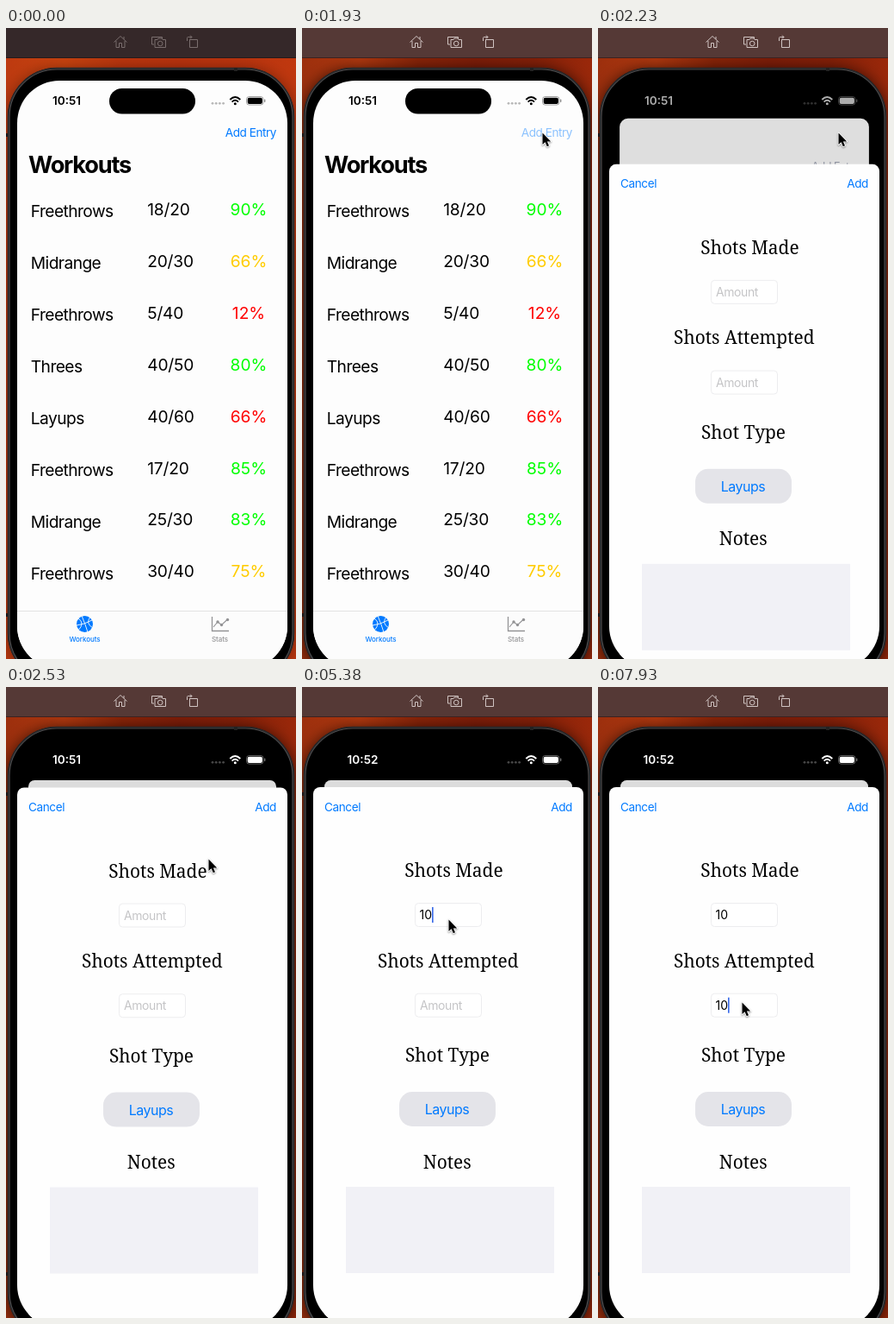
An HTML page with a canvas that plays this animation: 337x731 px, repeating every 8 s.

```html
<!DOCTYPE html>
<html lang="en">
<head>
<meta charset="utf-8">
<title>Workout tracker</title>
<style>
  html, body { margin: 0; height: 100%; overflow: hidden; background: #000; }
  canvas { display: block; width: 337px; height: 731px; }
</style>
</head>
<body>
<canvas></canvas>
<script>
const W = 337, H = 731, LOOP = 8000, TICK = 150;
const BLUE = '#007aff', GREEN = '#0f0', YELLOW = '#fc0', RED = '#f00';
const canvas = document.querySelector('canvas');
const ctx = canvas.getContext('2d');
const ratio = window.devicePixelRatio || 1;
canvas.width = W * ratio;
canvas.height = H * ratio;

const rows = [
  ['Freethrows', '18/20', '90%', GREEN],
  ['Midrange', '20/30', '66%', YELLOW],
  ['Freethrows', '5/40', '12%', RED],
  ['Threes', '40/50', '80%', GREEN],
  ['Layups', '40/60', '66%', RED],
  ['Freethrows', '17/20', '85%', GREEN],
  ['Midrange', '25/30', '83%', GREEN],
  ['Freethrows', '30/40', '75%', YELLOW],
];

// Pointer path: time, x, y
const pointerPath = [
  [900, 326, 330], [1180, 304, 262], [1330, 298, 236], [1480, 281, 162],
  [1630, 279, 123], [1930, 279, 121], [2380, 279, 121], [2530, 235, 199],
  [2680, 205, 236], [2830, 181, 262], [2980, 169, 272], [3280, 169, 271],
  [3430, 170, 269], [6280, 170, 269], [6430, 171, 292], [6730, 169, 354],
  [6880, 167, 365], [LOOP, 167, 365],
];

const clamp = v => Math.min(1, Math.max(0, v));
const mix = (a, b, k) => a + (b - a) * k;

function pointerAt(t) {
  const i = pointerPath.findIndex(key => key[0] > t);
  const [t0, x0, y0] = pointerPath[i - 1], [t1, x1, y1] = pointerPath[i];
  const k = (t - t0) / (t1 - t0);
  return [mix(x0, x1, k), mix(y0, y1, k)];
}

function text(str, x, y, size, color = '#000', opts = {}) {
  const { align = 'left', weight = 400, spacing = -0.03, family = 'Inter, sans-serif' } = opts;
  ctx.font = `${weight} ${size}px ${family}`;
  ctx.letterSpacing = `${spacing * size}px`;
  ctx.textAlign = align;
  ctx.fillStyle = color;
  ctx.fillText(str, x, y);
}

function box(x, y, w, h, r, fill, stroke, width = 1) {
  ctx.beginPath();
  ctx.roundRect(x, y, w, h, r);
  if (fill) { ctx.fillStyle = fill; ctx.fill(); }
  if (stroke) { ctx.strokeStyle = stroke; ctx.lineWidth = width; ctx.stroke(); }
}

function line(d, color, width = 1) {
  ctx.strokeStyle = color;
  ctx.lineWidth = width;
  ctx.stroke(new Path2D(d));
}

function disc(x, y, r, color) {
  ctx.fillStyle = color;
  ctx.beginPath();
  ctx.arc(x, y, r, 0, 7);
  ctx.fill();
}

function scoped(draw) {
  ctx.save();
  draw();
  ctx.restore();
}

function drawDesktop(active) {
  const wall = ctx.createLinearGradient(0, 0, W, 0);
  const stops = active
    ? ['#9c2f0d', '#b0380f', '#8a2408', '#801d08', '#862008', '#9a280a']
    : ['#bd3a10', '#c9430f', '#bb350e', '#b8320e', '#bb340e', '#c0380f'];
  stops.forEach((c, i) => wall.addColorStop(i / (stops.length - 1), c));
  ctx.fillStyle = wall;
  ctx.fillRect(0, 0, W, H);

  scoped(() => {
    ctx.shadowColor = `rgba(0,0,0,${active ? 0.7 : 0.4})`;
    ctx.shadowBlur = 18 * ratio;
    ctx.shadowOffsetY = 2 * ratio;
    box(2, 46, 333, 712, 57, '#111');
  });

  ctx.fillStyle = active ? '#553936' : '#352829';
  ctx.fillRect(0, 0, W, 34);
  ctx.fillStyle = active ? '#3c2220' : '#261a1a';
  ctx.fillRect(0, 34, W, 1);
  const ink = active ? '#d0c4c2' : '#796d6d';
  line('M125.5 16.5 133 9.5 140.5 16.5M128 15V22.5H131.5V17.5H134.5V22.5H138V15M137 10V13', ink);
  line('M172 19H169.5V10.5H181.5V12.5M173 13.5H176L177 12H181L182 13.5H185.5V22.5H173Z', ink);
  line('M176.4 18A2.8 2.8 0 1 0 182 18A2.8 2.8 0 1 0 176.4 18', ink);
  line('M213.5 13.5H222.5V22.5H213.5ZM210.5 15V11.5Q210.5 10.5 211.5 10.5H216M214 8.5 216 10.5 214 12.5', ink);
}

function drawPhone() {
  ctx.fillStyle = '#1c1414';
  ctx.fillRect(0, 122, 3, 4);
  ctx.fillRect(0, 678, 3, 4);
  box(2.5, 46.5, 332, 711, 57, '#111', '#29292b', 1.5);
  box(4, 48, 329, 708, 55, '#000', '#4c4c4e', 1.2);
  ctx.fillStyle = '#222';
  ctx.fillRect(265, 46, 4, 4);
}

function drawTabBar() {
  ctx.fillStyle = '#fcfcfc';
  ctx.fillRect(13, 675, 314, 80);
  ctx.fillStyle = '#dcdcde';
  ctx.fillRect(13, 675, 314, 0.8);
  disc(91.5, 690.5, 9.5, BLUE);
  line('M82 692Q91 691 100 686M88 681Q92 690 95 700M84 684Q92 689 84 698M98 682Q92 690 101 695', '#fcfcfc', 0.9);
  const label = { align: 'center', weight: 500, spacing: -0.01 };
  text('Workouts', 91.5, 711, 8, BLUE, label);
  const gray = '#939395';
  line('M239.5 682V698.5H259', gray, 1.3);
  line('M241 694 246 688 250.5 691.5 257.5 685', gray, 1.1);
  [[246, 688], [250.5, 691.5], [257.5, 685.5]].forEach(([x, y]) => disc(x, y, 1.7, gray));
  text('Stats', 248.5, 711, 8, gray, label);
}

function drawList(p, pressed) {
  scoped(() => {
    const scale = 1 - 0.083 * p;
    ctx.translate(170, 61 + 47 * p);
    ctx.scale(scale, scale);
    ctx.translate(-170, -61);
    box(13, 61, 314, 690, p ? mix(44, 8, p) : 0, '#fdfdfd');
    ctx.clip();

    const tint = Math.sqrt(p);
    const add = `rgb(${mix(0, 165, tint)},${mix(122, 165, tint)},${mix(255, 175, tint * tint)})`;
    ctx.globalAlpha = pressed ? 0.45 : 1;
    text('Add Entry', 314, 126, 13.6, add, { align: 'right', spacing: -0.035 });
    ctx.globalAlpha = 1;
    text('Workouts', 26, 168, 27.2, '#000', { weight: 700, spacing: -0.045 });

    rows.forEach(([name, score, percent, color], i) => {
      const y = 59.9 * i;
      text(name, 28.8, 219.3 + y, 19.2);
      text(score, 164.2, 217 + y, 19.2, '#000', { spacing: -0.01 });
      text(percent, 282, 217 + y, 19.2, color, { spacing: 0, align: 'center' });
      if (p) {
        ctx.fillStyle = '#dededf';
        ctx.fillRect(29, 180 + y, 298, 1);
      }
    });
    drawTabBar();
    ctx.fillStyle = `rgba(0,0,0,${0.13 * p})`;
    ctx.fillRect(13, 61, 314, 690);
  });
}

function drawField(y, value, caretAlpha) {
  box(131.5, y + 0.5, 77, 27, 4, '#fff', '#ededef');
  if (value) text(value, 136.5, y + 19, 14, '#000', { spacing: 0 });
  else text('Amount', 137, y + 19, 14, '#c5c5c7');
  if (!caretAlpha) return;
  const x = value ? 136.5 + ctx.measureText(value).width : 137;
  ctx.globalAlpha = caretAlpha;
  ctx.fillStyle = '#3567e8';
  ctx.fillRect(x, y + 5, 1.6, 18);
  ctx.globalAlpha = 1;
}

// A caret stays solid for 600 ms, then fades out and in again.
function blink(elapsed) {
  if (elapsed < 0) return 0;
  const m = elapsed % 1050;
  return m < 600 ? 1 : m < 750 || m >= 900 ? 0.5 : 0;
}

function heading(str, x, y) {
  text(str, x, y, 20.9, '#000', { align: 'center', spacing: 0, family: '"Noto Serif", serif' });
}

function typed(t, first, second) {
  return t < first ? '' : t < second ? '1' : '10';
}

function drawSheet(top, t) {
  scoped(() => {
    ctx.translate(0, top);
    box(13, 0, 314, 760, 8, '#fefefe');
    text('Cancel', 26, 27.5, 13.6, BLUE);
    text('Add', 314, 27.5, 13.6, BLUE, { align: 'right' });
    heading('Shots Made', 176.5, 104);
    heading('Shots Attempted', 169.8, 208.5);
    heading('Shot Type', 169, 318);
    heading('Notes', 168.7, 441.5);

    const lastEdit = t < 5230 ? 3730 : t < 5380 ? 5230 : 5380;
    drawField(134, typed(t, 5230, 5380), t < 7030 ? blink(t - lastEdit) : 0);
    drawField(238.7, typed(t, 7480, 7930), blink(t - 7030 - (t >= 7480 ? 450 : 0)));

    box(113, 353, 112, 40, 15, '#e4e4e9');
    text('Layups', 168.5, 379, 16, BLUE, { align: 'center' });
    ctx.fillStyle = '#f1f1f6';
    ctx.fillRect(51, 463, 242, 100);
  });
}

function drawStatus(t) {
  box(120, 70, 100, 29.5, 15, '#000');
  const v = Math.round(255 * clamp((t - 2060) / 250));
  const ink = `rgb(${v},${v},${v})`;
  text(t < 2830 ? '10:51' : '10:52', 70.5, 89, 13.6, ink, { align: 'center', weight: 600, spacing: 0 });
  ctx.globalAlpha = 0.28;
  for (let i = 0; i < 4; i++) disc(240 + 4.2 * i, 87.3, 1.4, ink);
  ctx.globalAlpha = 1;
  line('M260.3 83Q266.3 77.2 272.3 83', ink, 1.9);
  line('M262.6 85.6Q266.3 82 270 85.6', ink, 1.8);
  disc(266.3, 87.8, 1.5, ink);
  ctx.globalAlpha = 0.4;
  box(279.5, 79.5, 19.5, 9.6, 3, null, ink, 0.9);
  box(300, 82.5, 1.4, 3.6, 0.7, ink);
  ctx.globalAlpha = 1;
  box(280.7, 80.7, 17.2, 7.2, 2, ink);
}

function drawPointer([x, y]) {
  scoped(() => {
    ctx.translate(x, y);
    const arrow = new Path2D('M.5 .5V14L3.6 11.2 5.8 16.2 8 15.2 5.9 10.4H10.2Z');
    ctx.lineJoin = 'round';
    ctx.shadowColor = 'rgba(0,0,0,.4)';
    ctx.shadowBlur = 2 * ratio;
    ctx.shadowOffsetY = ratio;
    ctx.strokeStyle = '#fff';
    ctx.lineWidth = 1.8;
    ctx.stroke(arrow);
    ctx.shadowColor = 'transparent';
    ctx.fillStyle = '#000';
    ctx.fill(arrow);
  });
}

function draw(time) {
  const t = time < 900 ? 0 : Math.max(900, 1780 + TICK * Math.floor((time - 1780) / TICK));
  const u = Math.max(0, (t - 1970) * 0.0168);
  const p = 1 - (1 + u) * Math.exp(-u);

  ctx.setTransform(ratio, 0, 0, ratio, 0, 0);
  drawDesktop(t >= 1780);
  drawPhone();
  scoped(() => {
    box(13, 61, 314, 681, 49, '#000');
    ctx.clip();
    drawList(p, t === 1930);
    if (p) drawSheet(mix(731, 116, p), t);
    drawStatus(t);
  });
  if (t >= 900) drawPointer(pointerAt(t));
}

const start = performance.now();
function frame() {
  draw((performance.now() - start) % LOOP);
  requestAnimationFrame(frame);
}
frame();
</script>
</body>
</html>
```
